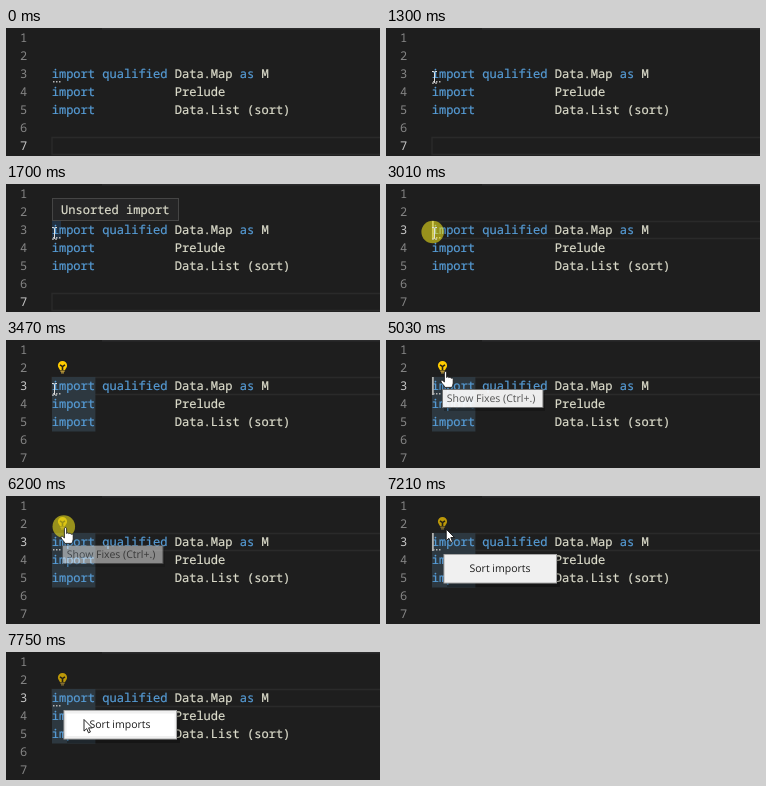
Animation, 374 px wide and 128 px high, one loop 8 s. Source, as an HTML page:

```html
<!DOCTYPE html>
<html lang="en">
<head>
<meta charset="utf-8">
<title>Sort imports</title>
<style>
  html, body { margin: 0; width: 100%; height: 100%; overflow: hidden; background: #1e1e1e; }
  svg { display: block; width: 100vw; height: 100vh; }
  text { white-space: pre; text-rendering: geometricPrecision; }
  .code { font: 12.06px "Noto Sans Mono", "DejaVu Sans Mono", monospace; fill: #dcdccb; stroke: #dcdccb; stroke-width: .2; }
  .kw { fill: #569cd6; stroke: #569cd6; }
  .num { fill: #858585; stroke: none; }
  .num.on { fill: #c6c6c6; }
  .ui { font: 10.5px "Open Sans", "Noto Sans", sans-serif; }
</style>
</head>
<body>
<svg viewBox="0 0 374 128" preserveAspectRatio="none">
  <rect width="374" height="128" fill="#1e1e1e"/>
  <rect x="96" width="278" height="1.5" fill="#2b2b2c"/>
  <rect id="line" x="46" width="340" height="17" fill="none" stroke="#2a2a2a" stroke-width="1.5"/>
  <g id="words" fill="#2d3840">
    <rect x="46" y="37" width="43.4" height="54.5"/>
  </g>
  <rect id="range" x="46" y="37" width="9" height="18" fill="#264f78" opacity=".4"/>
  <g id="code" class="code"></g>
  <g fill="#b4b4b4">
    <rect x="47" y="53" width="1.5" height="1.5"/>
    <rect x="50" y="53" width="1.5" height="1.5"/>
    <rect x="53" y="53" width="1.5" height="1.5"/>
  </g>
  <rect id="caret" x="46" y="37" width="1.8" height="18" fill="#aeafad"/>
  <g id="bulb">
    <path d="M56.5 21a4.6 4.6 0 0 0-4.6 4.5c0 2.1 1.5 2.9 2.1 4.7h5c.6-1.8 2.1-2.6 2.1-4.7a4.6 4.6 0 0 0-4.6-4.5z" fill="#fc0"/>
    <path d="M54 24.8l2.5 1.8L59 24.8M56.5 26.6V30" fill="none" stroke="#2a2410" stroke-width="1.6"/>
    <path d="M54.4 31.3h4.2M55 32.9h3" stroke="#d8b040" stroke-width="1"/>
  </g>
  <circle id="click" r="11.3" fill="#f5e81a" opacity=".57"/>
  <g id="hover">
    <rect x="46.5" y="14.5" width="126" height="22" fill="#252526" stroke="#454545"/>
    <text class="code" x="55" y="29.5">Unsorted import</text>
  </g>
  <g id="tip">
    <rect x="58" y="53" width="101" height="18" fill="#000" opacity=".25"/>
    <rect x="56.5" y="49.5" width="100.5" height="18" fill="#fff" stroke="#767676"/>
    <text class="ui" x="60.8" y="62" fill="#575757">Show Fixes (Ctrl+.)</text>
  </g>
  <g id="menu">
    <rect x="61" y="62" width="113" height="29" fill="#000" opacity=".3"/>
    <rect x="58" y="58.5" width="112.5" height="28.5" fill="#f0f0f0" stroke="#a8a8a8"/>
    <rect id="item" x="60.5" y="61.5" width="108" height="22.5" fill="#fff"/>
    <text class="ui" x="83.5" y="76.4" fill="#1a1a1a">Sort imports</text>
  </g>
  <path id="beam" fill="none" stroke="#dedede"
    d="M-2.5-5.8h1.8l.7.8.7-.8h1.8M0-5V5M-2.5 5.8h1.8l.7-.8.7.8h1.8"/>
  <path id="hand" fill="#fff" stroke="#111" stroke-width=".8" stroke-linejoin="round"
    d="M-1.1.9c0-1.5 2.2-1.5 2.2 0v4.8c.3-1 2.1-.9 2.3.3.6-.9 2.1-.6 2.2.6.8-.7 2.1-.2 2.1 1v3.7c0 1.9-1 2.4-1.3 4.3H-.7c-.4-2-2.7-3.3-3.7-5.6-.7-1.5 1.1-2.2 2-1L-1.1 10.2z"/>
  <path id="arrow" fill="#fff" stroke="#111" stroke-width=".9"
    d="M0 0v11.6l2.7-2.5 1.8 4.2 1.9-.8-1.8-4.1h3.7z"/>
</svg>
<script>
const LOOP = 8000, ROW = 18, CH = 7.236, LEFT = 45.7;
const $ = id => document.getElementById(id);
const baseline = n => 49.9 + (n - 3) * ROW;

// [line, column, text, class]
const words = [
  [3, 0, "import", "kw"], [3, 7, "qualified", "kw"], [3, 17, "Data.Map", ""],
  [3, 26, "as", "kw"], [3, 29, "M", ""],
  [4, 0, "import", "kw"], [4, 17, "Prelude", ""],
  [5, 0, "import", "kw"], [5, 17, "Data.List (sort)", ""]
];

function addText(x, line, str, cls) {
  const el = document.createElementNS("http://www.w3.org/2000/svg", "text");
  el.setAttribute("x", x);
  el.setAttribute("y", baseline(line));
  el.setAttribute("class", cls);
  el.textContent = str;
  return $("code").appendChild(el);
}

const nums = [1, 2, 3, 4, 5, 6, 7].map(n => addText(14, n, n, "num"));
words.forEach(([line, col, str, cls]) => addText(LEFT + col * CH, line, str, cls));

// Mouse moves: start, end, number of steps, from, to
const moves = [
  [690, 1300, 9, [205, 110], [48.5, 49.3]],
  [4010, 4480, 7, [48.5, 49.3], [59.5, 31.8]],
  [7210, 7750, 8, [59.5, 31.8], [78, 67.5]]
];

// Step tables: [time, value], each held until the next
const caretSteps = [[0, 0], [3010, 1], [3470, 0], [4010, 1], [4480, 0], [4960, 1],
  [5490, 0], [5970, 1], [6200, 0], [6270, 1], [6730, 0], [7210, 1], [7670, 0]];
const hoverSteps = [[0, 0], [1620, .5], [1700, 1], [3010, 0]];
const wordSteps = [[0, 0], [3240, .6], [3320, 1]];
const bulbSteps = [[0, 0], [3240, 1], [6120, .7]];
const tipSteps = [[0, 0], [4880, .3], [4960, .65], [5030, .92], [5110, 1],
  [6120, .8], [6200, .48], [6270, 0]];
const menuSteps = [[0, 0], [6270, .5], [6350, 1]];

function held(steps, t) {
  let v = 0;
  for (const [at, val] of steps) if (t >= at) v = val;
  return v;
}

const ease = p => (1 - Math.cos(Math.PI * p)) / 2;

function mouseAt(t) {
  let pos = null;
  for (const [start, end, n, a, b] of moves) {
    if (t < start) break;
    const k = Math.floor((t - start) / (end - start) * (n - 1) + .02);
    const p = ease(Math.min(1, (k + 1) / n));
    pos = a.map((v, i) => v + (b[i] - v) * p);
  }
  return pos;
}

const fade = (id, v) => $(id).setAttribute("opacity", v);
const show = (id, on) => $(id).setAttribute("visibility", on ? "visible" : "hidden");

function draw(t) {
  const active = t < 3010 ? 7 : 3;
  nums.forEach((el, i) => el.classList.toggle("on", i + 1 === active));
  $("line").setAttribute("y", 37.5 + (active - 3) * ROW);

  fade("caret", held(caretSteps, t));
  fade("hover", held(hoverSteps, t));
  fade("words", held(wordSteps, t));
  fade("bulb", held(bulbSteps, t));
  fade("tip", held(tipSteps, t));
  fade("menu", held(menuSteps, t));
  show("range", t >= 1620 && t < 3010);

  const first = t >= 3010 && t < 3090, second = t >= 6120 && t < 6270;
  show("click", first || second);
  $("click").setAttribute("cx", first ? 46.7 : 57.8);
  $("click").setAttribute("cy", first ? 48 : 30.5);

  const pos = mouseAt(t);
  const kind = !pos ? "" : t >= 7210 ? "arrow" : pos[1] < 36.5 ? "hand" : "beam";
  for (const id of ["beam", "hand", "arrow"]) {
    show(id, id === kind);
    if (id === kind) $(id).setAttribute("transform", `translate(${pos[0]} ${pos[1]})`);
  }
  show("item", kind === "arrow" && pos[1] > 61.5);
}

const begin = performance.now();
function tick() {
  draw((performance.now() - begin) % LOOP);
  requestAnimationFrame(tick);
}
tick();
</script>
</body>
</html>
```
